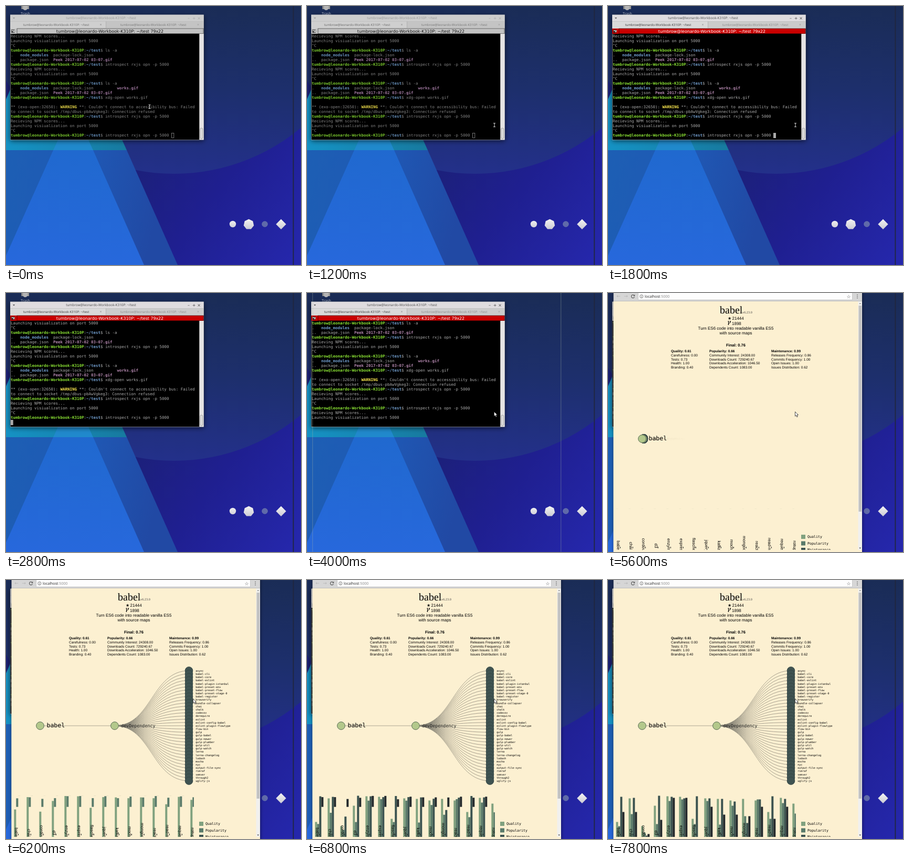
Animation, 562 px wide and 494 px high, one loop 8000 ms. Source, as an HTML page with a canvas:

```html
<!DOCTYPE html>
<html lang="en">
<head>
<meta charset="utf-8">
<title>Terminal to dependency graph</title>
<style>
html, body { margin: 0; width: 100%; height: 100%; overflow: hidden; background: #1c2560; }
canvas { display: block; }
</style>
</head>
<body>
<canvas id="stage" width="562" height="494"></canvas>
<script>
const c = document.getElementById('stage').getContext('2d');
c.textRendering = 'geometricPrecision';

const LOOP = 8000, STEP = 200;
const MONO = '"DejaVu Sans Mono", monospace';
const SANS = '"Liberation Sans", Arial, sans-serif';
const UI = '"Open Sans", "Noto Sans", sans-serif';
const WIDE = '"DejaVu Sans", sans-serif';
const HOST = 'tumbrow@leonardo-Workbook-K310P';
const TITLE = HOST + ': ~/test';

const rect = (x, y, w, h, fill) => { c.fillStyle = fill; c.fillRect(x, y, w, h); };

function text(s, x, y, font, fill = '#000', align = 'left') {
  c.font = font;
  c.fillStyle = fill;
  c.textAlign = align;
  c.fillText(s, x, y);
}

function poly(points, fill, stroke) {
  c.beginPath();
  points.forEach(([x, y]) => c.lineTo(x, y));
  c.closePath();
  if (fill) { c.fillStyle = fill; c.fill(); }
  if (stroke) { c.lineWidth = 0.8; c.strokeStyle = stroke; c.stroke(); }
}

function disc(x, y, r, fill, stroke) {
  c.beginPath();
  c.arc(x, y, r, 0, 7);
  if (fill) { c.fillStyle = fill; c.fill(); }
  if (stroke) { c.strokeStyle = stroke; c.stroke(); }
}

function line(points, stroke, width = 1) {
  c.beginPath();
  points.forEach(([x, y]) => c.lineTo(x, y));
  c.lineWidth = width;
  c.strokeStyle = stroke;
  c.stroke();
}

function shade(x0, y0, x1, y1, ...colors) {
  const g = c.createLinearGradient(x0, y0, x1, y1);
  colors.forEach((col, i) => g.addColorStop(i / (colors.length - 1), col));
  return g;
}

// Rectangle with a soft drop shadow
function raised(x, y, w, h, fill, blur) {
  c.save();
  c.shadowColor = 'rgba(0,0,0,.6)';
  c.shadowBlur = blur;
  c.shadowOffsetY = 2;
  rect(x, y, w, h, fill);
  c.restore();
}

function ease(k) {
  k = Math.min(1, Math.max(0, k));
  return k < 0.5 ? 4 * k ** 3 : 1 - 4 * (1 - k) ** 3;
}

// ---------- desktop ----------

function desktop() {
  rect(0, 0, 562, 494, shade(230, 260, 540, 494, '#1b2074', '#1f1f90', '#2527ab'));
  disc(320, -57, 377, shade(0, 0, 0, 320, '#1a2c56', '#1d2f6c', '#23308a'));
  poly([[0, 178], [10, 155], [176, 155], [230, 275], [0, 275]], shade(0, 0, 230, 0, '#1592c4', '#177a9f'));
  poly([[0, 275], [230, 275], [327, 494], [0, 494]], shade(0, 275, 300, 350, '#1d5fb4', '#1f58b4', '#2149a4'));
  poly([[96, 262], [102, 249], [154, 249], [166, 275], [90, 275]], '#2089cc');
  poly([[90, 275], [166, 275], [263, 494], [-8, 494]], shade(0, 275, 0, 494, '#2069cf', '#2768dc'));
  rect(546.5, 0, 1.8, 494, '#20263e');

  const metal = shade(0, 405, 0, 427, '#f6f6f6', '#c9c9d2');
  disc(432, 416, 6.2, metal);
  poly(Array.from({ length: 7 }, (_, i) => {
    const a = i * Math.PI * 2 / 7 - Math.PI / 2;
    return [462.5 + 10 * Math.cos(a), 416.5 + 10 * Math.sin(a)];
  }), metal);
  disc(493, 416, 5.8, '#5a64a6');
  c.setLineDash([1, 1]);
  c.lineWidth = 1;
  disc(493, 416, 4.5, null, '#7f8bbc');
  disc(493, 416, 2, null, '#7f8bbc');
  c.setLineDash([]);
  poly([[524, 406.5], [533.7, 416.3], [524, 426], [514.3, 416.3]], metal);

  rect(29, 0, 15, 6, shade(29, 0, 44, 0, '#777', '#ddd', '#888'));
  disc(36.5, 4, 4, '#b5b5b5');
  text('Trash', 37, 17, '7px ' + UI, '#c5cad5', 'center');
}

// ---------- terminal ----------

const prompt = cmd => [[HOST, 'g'], [':', 'w'], ['~/test', 'b'], ['$ ' + cmd, 'w']];
const plain = s => [[s, 'w']];
const run = prompt('introspect rxjs opn -p 5000');
const output = [plain('Recieving NPM scores...'), plain('Launching visiualization on port 5000')];
const listing = extra => [
  prompt('ls -a'),
  [['.   ', 'w'], ['node_modules', 'b'], ['  package-lock.json', 'w'], [extra, 'p']],
  [['..  package.json  ', 'w'], ['Peek 2017-07-02 03-07.gif', 'p']]
];
const log = [
  ...output, plain('^C'), ...listing(''),
  run, ...output, plain('^C'), ...listing('          works.gif'),
  prompt('xdg-open works.gif'), plain(''),
  [['** (exo-open:32650): ', 'w'], ['WARNING', 'y'],
    [" **: Couldn't connect to accessibility bus: Failed", 'w']],
  plain('to connect to socket /tmp/dbus-pbAwVgkeg3: Connection refused'),
  run, ...output, plain('^C'), run, ...output
];
const BRIGHT = { w: '#acacac', g: '#8ae234', b: '#729fcf', p: '#b387ae', y: '#fce94f' };
const DIM = { w: '#838383', g: '#76c22c', b: '#668fba', p: '#a078a0', y: '#e6d648' };

function terminal(t) {
  const active = t >= 1600 && t < 4400;
  const ink = active ? BRIGHT : DIM;
  const soft = active ? '#4a4a4a' : '#969696';

  raised(8, 16.5, 368.7, 239, '#cfcfcf', 9);
  rect(8, 17, 368.5, 12, active ? '#dfdcdf' : '#cdcdcd');
  rect(8, 29, 182, 13, active ? '#d9d9d9' : '#cfcfcf');
  rect(190, 29, 186.5, 13, active ? '#cbcbcb' : '#c4c4c4');
  line([[190.5, 29], [190.5, 42]], '#aaa', 0.7);
  line([[8, 29.5], [376.5, 29.5]], '#bbb', 0.6);
  text(TITLE, 181, 25.3, '6.4px ' + UI, soft, 'center');
  text(TITLE, 95.5, 38, '6px ' + UI, active ? '#333' : '#666', 'center');
  text(TITLE, 280.5, 38, '6px ' + UI, active ? '#888' : '#777', 'center');
  text('×', 180.5, 38, '7px ' + UI, '#888', 'center');
  text('×', 366, 38, '7px ' + UI, '#999', 'center');
  [['–', 348], ['+', 358], ['×', 367.5]].forEach(([s, x]) =>
    text(s, x, 25.5, '8px ' + WIDE, active ? '#444' : '#aaa', 'center'));
  poly([[13, 22], [17, 22], [15, 24.5]], soft);

  rect(8, 43, 368.5, 10, active ? '#c90000' : '#c2c2c2');
  c.lineWidth = 1;
  c.strokeStyle = 'rgba(0,0,0,.5)';
  c.strokeRect(21, 43, 355, 9.7);
  text(TITLE + ' 79x22', 198, 50.8, '7.9px ' + WIDE, active ? '#fff' : '#111', 'center');
  rect(10, 45, 6.5, 6, active ? '#3d2020' : '#444');
  rect(11, 46, 2, 2, '#ddd');
  rect(14, 46, 2, 4, '#ddd');

  rect(8.5, 53, 360, 202, '#000');
  rect(368.5, 53, 8, 202, '#e6e4e4');
  c.lineWidth = 0.8;
  c.strokeStyle = '#999';
  c.fillStyle = '#dcdcdc';
  c.beginPath();
  c.roundRect(369.8, 233, 5, 20, 2);
  c.fill();
  c.stroke();

  const scroll = (t >= 2800) + (t >= 3200) + (t >= 3400);
  log.slice(scroll, 22 + Math.max(0, scroll - 1)).forEach((row, i) => {
    let x = 9;
    row.forEach(([s, k]) => {
      text(s, x, 60.3 + 9 * i, (k === 'w' ? '' : 'bold ') + '7.475px ' + MONO, ink[k]);
      x += 4.5 * s.length;
    });
  });

  if (!active) {
    c.lineWidth = 0.8;
    c.strokeStyle = '#8c8c8c';
    c.strokeRect(315.4, 242.5, 4.4, 9);
  } else if (t < 2200) rect(315, 242, 5, 10, '#aaa');
  else if (t >= 2800 && t < 4000) rect(9, 242, 4.7, 10, '#aaa');
}

// ---------- pointer ----------

function beam(x, y) {
  line([[x - 2, y - 3.5], [x + 2, y - 3.5]], '#d5d5d5', 1);
  line([[x, y - 3.5], [x, y + 3.5]], '#d5d5d5', 1);
  line([[x - 2, y + 3.5], [x + 2, y + 3.5]], '#d5d5d5', 1);
}

function arrow(x, y) {
  poly([[0, 0], [0, 8.5], [2, 6.8], [3.4, 10], [4.8, 9.3], [3.5, 6.3], [6, 6]]
    .map(([dx, dy]) => [x + dx, y + dy]), '#fff', '#222');
}

// ---------- browser ----------

// Edges of the window that is about to open
function outline() {
  c.setLineDash([1, 1]);
  [10.7, 483.8].forEach(x => line([[x, 0], [x, 494]], 'rgba(165,180,165,.8)', 1));
  c.setLineDash([]);
}

function chrome() {
  raised(10.5, -10, 473.5, 520, '#d6d6d6', 7);
  rect(57.5, -1, 408, 14, '#fdfdfd');
  line([[57.5, 0], [57.5, 13], [465.5, 13], [465.5, 0]], '#bbb', 0.7);
  line([[10.5, 15.3], [484, 15.3]], '#b8b8b8', 0.8);
  text('←', 20, 9.3, '9px ' + WIDE, '#b4b4b4', 'center');
  text('→', 34, 9.3, '9px ' + WIDE, '#b4b4b4', 'center');
  c.beginPath();
  c.arc(47.5, 6.5, 3, 0.3, 5.4);
  c.lineWidth = 1.1;
  c.strokeStyle = '#555';
  c.stroke();
  poly([[51.2, 2.8], [51.2, 6], [48, 6]], '#555');
  c.lineWidth = 0.8;
  disc(63.8, 6.5, 3.1, null, '#666');
  rect(63.4, 4.6, 0.9, 0.9, '#666');
  rect(63.4, 6.1, 0.9, 2.4, '#666');
  c.font = '7px ' + UI;
  const w = c.measureText('localhost').width;
  text('localhost', 70, 9, '7px ' + UI, '#222');
  text(':5000', 70 + w, 9, '7px ' + UI, '#888');
  text('☆', 458.5, 9.5, '9px ' + WIDE, '#555', 'center');
  [3.5, 6.5, 9.5].forEach(y => disc(475, y, 0.8, '#555'));
  rect(10.5, 16, 473.5, 478, '#fcf0d1');
}

function spinner(t) {
  const count = 17, turn = Math.PI * 2 / count;
  const head = 3 + (t - 4400) / 1000 * count;
  for (let i = 0; i < count; i++) {
    const behind = (((head - i) % count) + count) % count;
    c.save();
    c.globalAlpha = Math.max(0, 1 - behind / 10.2);
    c.translate(249, 257);
    c.rotate(i * turn);
    c.fillStyle = '#56796a';
    c.beginPath();
    c.roundRect(34, -2.4, 14.5, 4.8, 2);
    c.fill();
    c.restore();
  }
}

const stats = [
  [120, 'Quality: 0.61', 'Carefulness: 0.00', 'Tests: 0.73', 'Health: 1.00', 'Branding: 0.40'],
  [193, 'Popularity: 0.66', 'Community Interest: 24308.00', 'Downloads Count: 729240.67',
    'Downloads Acceleration: 1046.50', 'Dependents Count: 1083.00'],
  [311, 'Maintenance: 0.99', 'Releases Frequency: 0.86', 'Commits Frequency: 1.00',
    'Open Issues: 1.00', 'Issues Distribution: 0.62']
];

function summary() {
  text('babel', 213, 38.5, '20px "Liberation Serif", serif');
  text('v6.23.0', 256, 38.5, '6.3px "Liberation Serif", serif', '#444');
  text('★', 228, 51, '8px ' + WIDE);
  text('21444', 236.5, 51, '8px ' + SANS);
  line([[229.5, 54], [229.5, 60.5]], '#000', 1);
  line([[229.5, 58], [233, 56.5], [233, 54]], '#000', 1);
  [[229.5, 54.2], [233, 54.2], [229.5, 60]].forEach(([x, y]) => disc(x, y, 1, '#000'));
  text('1898', 236, 60.7, '8px ' + SANS);
  text('Turn ES6 code into readable vanilla ES5', 243.5, 69.5, '8px ' + SANS, '#000', 'center');
  text('with source maps', 243.5, 78.5, '8px ' + SANS, '#000', 'center');
  text('Final: 0.76', 243.5, 102, 'bold 7.6px ' + SANS, '#000', 'center');
  stats.forEach(([x, ...rows]) => rows.forEach((s, i) =>
    text(s, x, 113.4 + 7.55 * i, (i ? '' : 'bold ') + '6.5px ' + SANS)));
}

const deps = ('async babel-cli babel-core babel-eslint babel-plugin-istanbul babel-preset-env ' +
  'babel-preset-flow babel-preset-stage-0 babel-register browserify bundle-collapser chai chalk ' +
  'codecov derequire eslint eslint-config-babel eslint-plugin-flowtype flow-bin gulp gulp-babel ' +
  'gulp-newer gulp-plumber gulp-util gulp-watch lerna lerna-changelog lodash mocha nyc ' +
  'output-file-sync rimraf semver through2 uglify-js').split(' ');

function tree(t) {
  const k = ease((t - 5500) / 700);
  const rootX = 65, midY = 278, devX = rootX + 142 * k, leafX = rootX + 283.5 * k;
  const leafY = i => midY + (i - 17) * 6.18 * k;

  line([[rootX, midY], [devX, midY]], '#a39d8b', 0.9);
  c.strokeStyle = '#827e72';
  c.lineWidth = 0.7;
  const bend = (devX + leafX) / 2;
  deps.forEach((_, i) => {
    c.beginPath();
    c.moveTo(devX, midY);
    c.bezierCurveTo(bend, midY, bend, leafY(i), leafX, leafY(i));
    c.stroke();
  });
  c.lineWidth = 1;
  deps.forEach((_, i) => disc(leafX, leafY(i), 7.3, '#3f5351', '#354644'));
  [devX, rootX].forEach(x => disc(x, midY, 7.4, '#b3c88b', '#5c6e58'));
  text('babel', 77.5, 281, '11.5px ' + MONO);
  c.globalAlpha = k;
  text('devDependency', devX + 12, 280.5, '8.4px ' + MONO, '#222');
  deps.forEach((s, i) => text(s, leafX + 12.7, leafY(i) + 1.9, '5px ' + MONO));
  c.globalAlpha = 1;
}

// Distance of each bar's top below the chart's upper edge, four series per package
const scores = {
  babel: [50, 58, 2, 31], chai: [5, 35, 4, 31], cordova: [58, 70, 76, 73],
  d3: [19, 54, 0, 46], enzyme: [1, 10, 2, 4], express: [2, 7, 5, 4],
  flaschen: [44, 54, 1, 79], jquery: [5, 10, 5, 21], kafka: [6, 55, 6, 36],
  mocha: [9, 19, 11, 36], mongoose: [6, 39, 52, 39], react: [9, 7, 7, 21],
  'read-me': [31, 44, 1, 44], request: [4, 14, 6, 21], rollup: [15, 34, 20, 30]
};
const series = ['#80a17f', '#5a7b6a', '#3c5350', '#23292c'];

function chart(t) {
  const top = 411.5, depth = 250;
  c.save();
  c.beginPath();
  c.rect(11, 400, 347, 90);
  c.clip();
  Object.entries(scores).forEach(([name, tops], g) => {
    const x = 15.3 + 24 * g;
    tops.forEach((y, s) => {
      const k = ease((t - 5540 - 300 * s) / 1300);
      rect(x + 4 * s, top + y * k, 4, (depth - y) * k, series[s]);
    });
    rect(x + 7.5, 484, 1, 3, '#222');
    c.save();
    c.translate(x + 1.5, 482);
    c.rotate(Math.PI / 2);
    text(name, 0, 0, '8px ' + SANS, '#000', 'center');
    c.restore();
  });
  c.restore();

  c.save();
  c.beginPath();
  c.rect(360, 400, 117, 90);
  c.clip();
  ['Quality', 'Popularity', 'Maintenance'].forEach((s, i) => {
    rect(368, 461 + 12.5 * i, 8, 8, series[i]);
    text(s, 380, 467.3 + 12.5 * i, '6.65px ' + MONO);
  });
  c.restore();
}

function scrollbar() {
  rect(476.5, 16, 7.5, 474, '#f1f0ee');
  rect(477.5, 24, 5.5, 393, '#c2c2c2');
  poly([[478.5, 21], [482, 21], [480.2, 18.7]], '#888');
  poly([[478.5, 485.5], [482, 485.5], [480.2, 488]], '#555');
}

// ---------- timeline ----------

function draw(t) {
  desktop();
  terminal(t);
  if (t < 1200) beam(273.5, 192);
  else if (t < 2800) beam(357, 227);
  if (t >= 4000 && t < 4400) outline();
  if (t >= 4400) {
    chrome();
    if (t < 5600) spinner(t);
    else {
      summary();
      tree(t);
      chart(t);
      scrollbar();
    }
  }
  if (t >= 4000) arrow(356.5, 226.5);
}

function tick() {
  const t = performance.now() % LOOP;
  draw(Math.floor(t / STEP) * STEP);
  requestAnimationFrame(tick);
}
tick();
</script>
</body>
</html>
```
